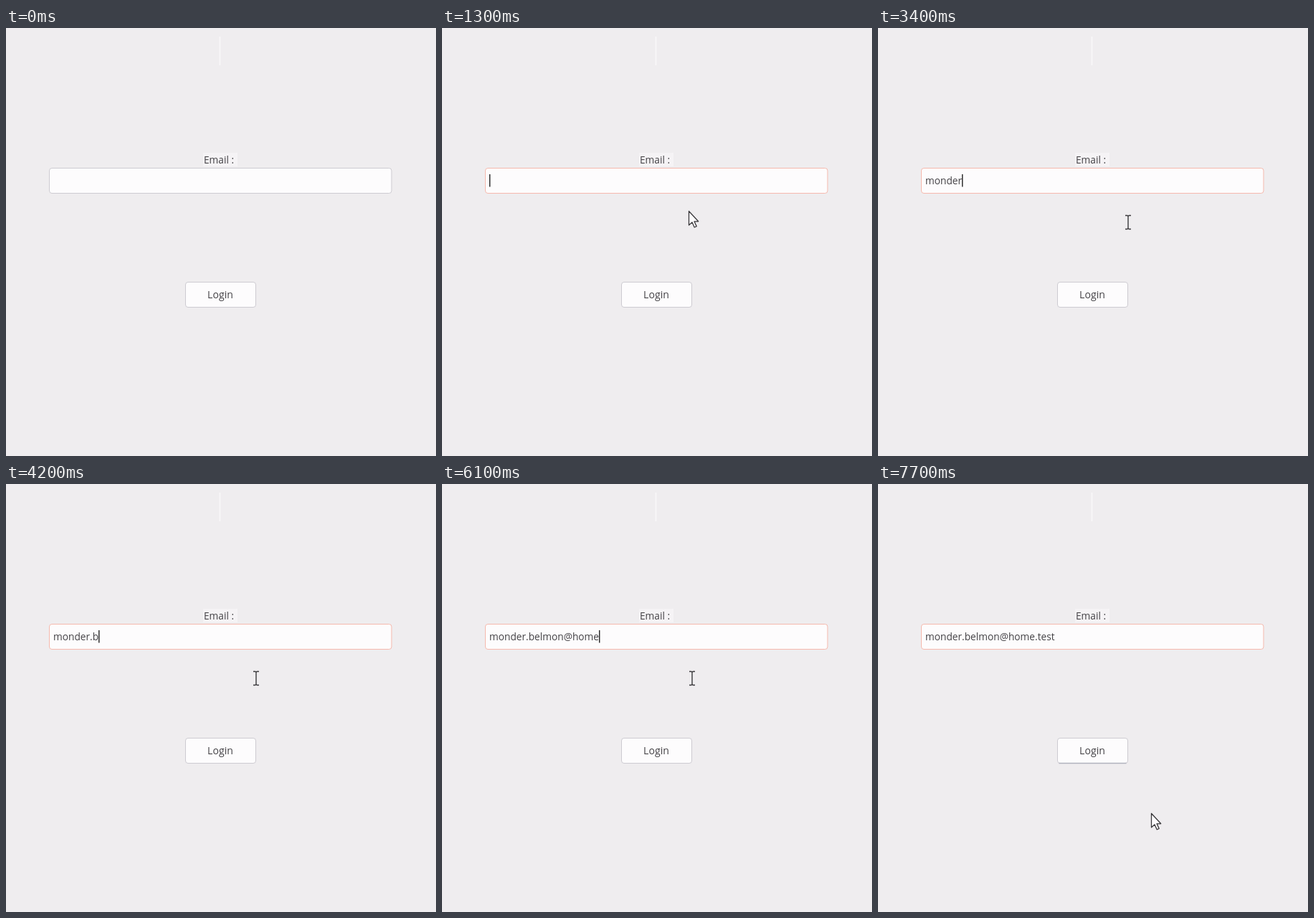
Recreate the animation shown at these times as an HTML page. Size 600 by 597 pixels, loop 8 s.

```html
<!DOCTYPE html>
<html lang="en">
<head>
<meta charset="utf-8">
<title>Login form</title>
<style>
  html, body { margin: 0; width: 100%; height: 100%; overflow: hidden; background: #efedef; }
  svg { display: block; width: 100%; height: 100%; }
  text { font: 13.7px "Open Sans", "Noto Sans", sans-serif; fill: #434145; }
</style>
</head>
<body>
<svg viewBox="0 0 600 597">
  <rect width="600" height="597" fill="#efedef"/>
  <path d="M298.5 12V52" stroke="#f9f8f9" stroke-width="1.6"/>
  <rect x="275" y="174" width="48" height="19" fill="#f5f3f5"/>
  <text x="276" y="189">Email :</text>
  <rect id="field" x="60.5" y="195.5" width="477.5" height="35" rx="3.5" fill="#fdfcfd"/>
  <text id="typed" x="66" y="218"></text>
  <path id="caret" d="M0 204V221.5" stroke="#222" stroke-width="1.4"/>
  <rect x="250.5" y="354.5" width="98" height="35" rx="3.5" fill="#fdfcfd" stroke="#cdcbd1"/>
  <path id="shade" d="M252.5 389.5H346.5" stroke="#b0b2bd" stroke-width="1.3"/>
  <text x="299" y="377" text-anchor="middle" style="font-size:14.1px">Login</text>
  <path id="arrow" d="M.5 .5V20L5 16L8.2 23L11.2 21.6L8 14.8H13.7Z" fill="#fdfcfd" stroke="#3a393c" stroke-width="1.3" stroke-linejoin="round"/>
  <path id="beam" d="M-4 -9.5H-1.2L0 -8.5L1.2 -9.5H4M0 -8.5V8.5M-4 9.5H-1.2L0 8.5L1.2 9.5H4" fill="none" stroke="#3a393c" stroke-width="1.4"/>
</svg>
<script>
const LOOP = 8000, STEP = 100;
const EMAIL = "monder.belmon@home.test";
const $ = id => document.getElementById(id);
const [field, typed, caret, shade, arrow, beam] =
  ["field", "typed", "caret", "shade", "arrow", "beam"].map($);

// Times at which each character appears, in tenths of a second
const keys = [21, 24, 26, 28, 30, 33, 41, 42, 44, 46, 48, 48, 50, 54, 56, 58, 60, 61, 63, 64, 65, 67, 70];
const caretOn = [[12, 19], [21, 37], [41, 48], [49, 74]];

// Pointer positions, one per step
const approach = [[352, 535], [340, 420], [357, 335], [356, 275], [352, 228], [350, 208], [350, 206], [348, 222], [344, 255]];
const leave = [[348, 277], [346, 300], [344, 335], [344, 372], [355, 410], [370, 442], [381, 459]];

const within = (t, [from, to]) => t >= from && t < to;
const show = (el, on) => el.setAttribute("visibility", on ? "visible" : "hidden");
const move = (el, x, y) => el.setAttribute("transform", `translate(${x} ${y})`);

function pointer(t) {
  if (t < 5) return null;
  if (t < 14) return approach[t - 5];
  if (t < 71) return [349, 271];
  return leave[Math.min(t - 71, leave.length - 1)];
}

function draw(ms) {
  const t = Math.floor(ms % LOOP / STEP);
  const text = EMAIL.slice(0, keys.filter(k => k <= t).length);
  if (typed.textContent !== text) typed.textContent = text;
  field.setAttribute("stroke", t >= 11 ? "#f5b9ad" : "#cdcbd1");

  show(caret, caretOn.some(span => within(t, span)));
  move(caret, 66.7 + (text ? typed.getComputedTextLength() : 0), 0);
  show(shade, within(t, [6, 9]) || t >= 74);

  const spot = pointer(t);
  const isBeam = within(t, [9, 12]) || within(t, [14, 71]);
  show(beam, spot && isBeam);
  show(arrow, spot && !isBeam);
  if (spot) move(isBeam ? beam : arrow, ...spot);
}

const start = performance.now();
function tick() {
  draw(performance.now() - start);
  requestAnimationFrame(tick);
}
tick();
</script>
</body>
</html>
```
